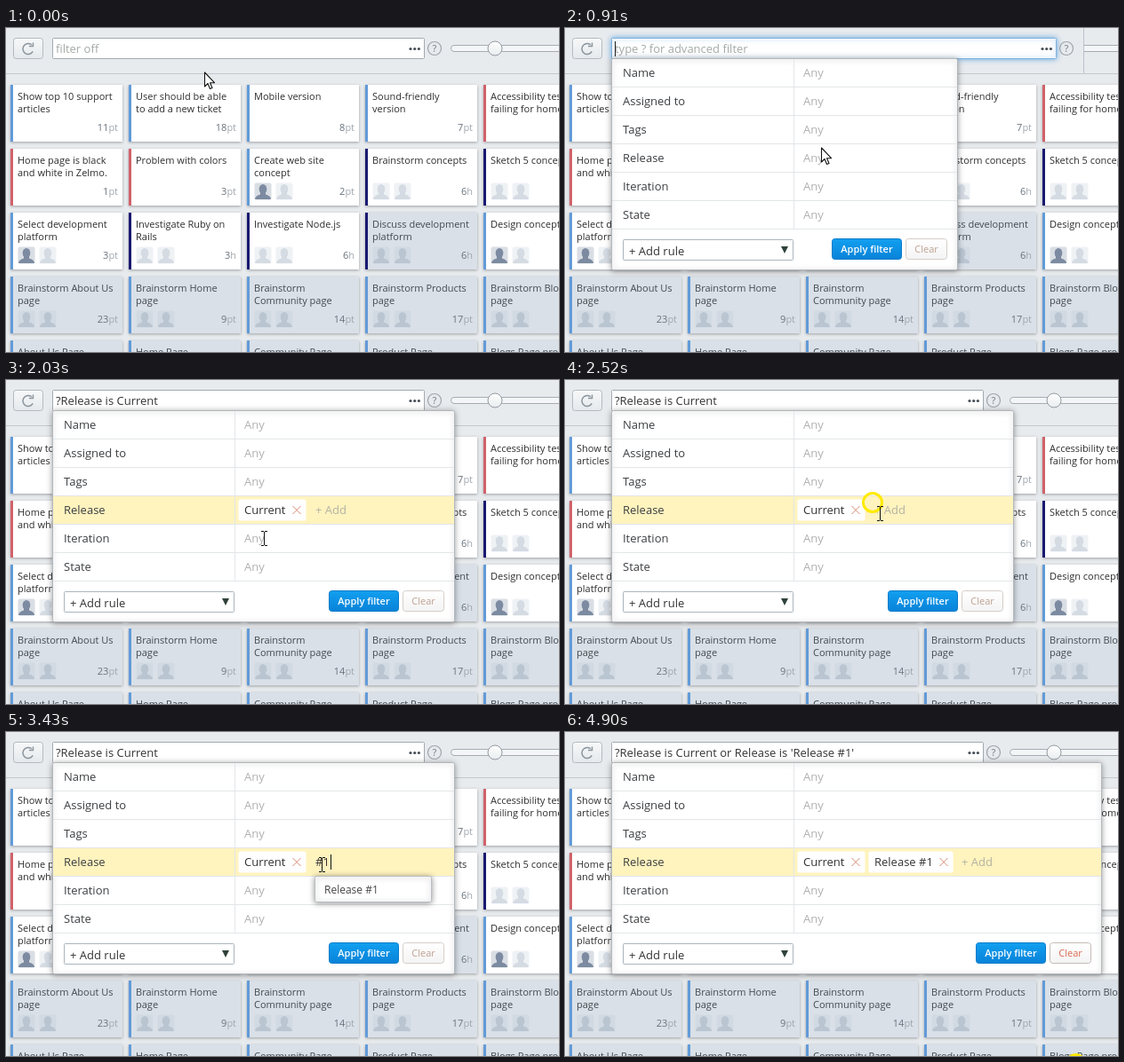
Animation, 622 px wide and 365 px high, one loop 5.04 s. Source, as an HTML page with a canvas:

```html
<!DOCTYPE html>
<html lang="en">
<head>
<meta charset="utf-8">
<title>Board filter</title>
<style>
html, body { margin: 0; width: 100%; height: 100%; overflow: hidden; background: #e8ebee; }
canvas { display: block; }
</style>
</head>
<body>
<canvas id="stage" width="622" height="365"></canvas>
<script>
const ctx = document.getElementById('stage').getContext('2d');
const LOOP = 5040, STEP = 70;
const BLUE = '#629bd8', RED = '#d0626b', NAVY = '#191970';

// bar colour, title lines, effort, avatars (D dark, L light), shaded
const rows = [
  [
    [BLUE, 'Show top 10 support|articles', '11pt'],
    [BLUE, 'User should be able|to add a new ticket', '18pt'],
    [BLUE, 'Mobile version', '8pt'],
    [BLUE, 'Sound-friendly|version', '7pt'],
    [RED, 'Accessibility test is|failing for home page', '']
  ], [
    [RED, 'Home page is black|and white in Zelmo.', '1pt'],
    [RED, 'Problem with colors', '3pt'],
    [BLUE, 'Create web site|concept', '2pt', 'DL'],
    [NAVY, 'Brainstorm concepts', '6h', 'LL'],
    [NAVY, 'Sketch 5 concepts', '', 'LL']
  ], [
    [BLUE, 'Select development|platform', '3pt', 'DL'],
    [NAVY, 'Investigate Ruby on|Rails', '3h', 'LL'],
    [NAVY, 'Investigate Node.js', '6h', 'LL'],
    [NAVY, 'Discuss development|platform', '6h', 'LL', true],
    [BLUE, 'Design concept', '', 'DL']
  ], [
    [BLUE, 'Brainstorm About Us|page', '23pt', 'LL', true],
    [BLUE, 'Brainstorm Home|page', '9pt', 'LL', true],
    [BLUE, 'Brainstorm|Community page', '14pt', 'LL', true],
    [BLUE, 'Brainstorm Products|page', '17pt', 'LL', true],
    [BLUE, 'Brainstorm Blogs|page', '', 'LL', true]
  ],
  ['About Us Page', 'Home Page', 'Community Page', 'Product Page', 'Blogs Page project']
    .map(title => [BLUE, title, '', '', true])
];
const rules = ['Name', 'Assigned to', 'Tags', 'Release', 'Iteration', 'State'];
const releases = ['Release #1', 'Release #2', 'Release #3'];

// time, x, y, shape
const pointer = [
  [0, 223, 50, 'arrow'], [70, 220, 34, 'arrow'], [140, 218, 21, 'beam'],
  [490, 218, 21, 'beam'], [560, 228, 40, 'arrow'], [840, 286, 131, 'arrow'],
  [980, 289, 139, 'beam'], [1470, 289, 139, 'beam'], [1540, 291, 148, 'beam'],
  [1610, 295, 165, 'hand'], [1680, 297, 172, 'hand'], [1820, 294, 175, 'hand'],
  [2030, 290, 178, 'beam'], [2100, 290, 178, 'beam'], [2380, 346, 138, 'beam'],
  [2450, 348, 141, 'beam'], [2520, 354, 150, 'beam'], [2590, 355, 149, 'beam'],
  [3570, 355, 149, 'beam'], [3640, 358, 160, 'beam'], [3710, 363, 169, 'hand'],
  [3850, 363, 171, 'hand'], [3920, 363, 174, 'beam'], [4340, 363, 174, 'beam'],
  [4410, 378, 187, 'arrow'], [4690, 542, 372, 'arrow'], [LOOP, 574, 374, 'arrow']
];
// start, end, x, y
const clicks = [
  [350, 490, 218, 21], [1050, 1190, 289, 139], [1960, 2030, 294, 176],
  [2450, 2590, 346, 138], [3780, 3920, 363, 173], [4900, LOOP, 574.5, 374]
];

const clamp = v => Math.max(0, Math.min(1, v));
const ease = v => { v = clamp(v); return v * v * (3 - 2 * v); };

function text(str, x, y, size = 13, color = '#333', weight = 400, align = 'left') {
  ctx.font = `${weight} ${size}px "Open Sans", sans-serif`;
  ctx.textAlign = align;
  ctx.fillStyle = color;
  ctx.fillText(str, x, y);
}

function rect(x, y, w, h, color) {
  ctx.fillStyle = color;
  ctx.fillRect(x, y, w, h);
}

function box(x, y, w, h, r, fill, border) {
  ctx.beginPath();
  ctx.roundRect(x + .5, y + .5, w - 1, h - 1, r);
  ctx.fillStyle = fill;
  ctx.fill();
  if (border) {
    ctx.strokeStyle = border;
    ctx.lineWidth = 1;
    ctx.stroke();
  }
}

function shadowed(color, blur, dy, draw) {
  ctx.save();
  ctx.shadowColor = color;
  ctx.shadowBlur = blur;
  ctx.shadowOffsetY = dy;
  draw();
  ctx.restore();
}

function vertical(y, h, top, bottom) {
  const g = ctx.createLinearGradient(0, y, 0, y + h);
  g.addColorStop(0, top);
  g.addColorStop(1, bottom);
  return g;
}

function line(points, color, width = 1) {
  ctx.beginPath();
  points.forEach(([x, y]) => ctx.lineTo(x, y));
  ctx.strokeStyle = color;
  ctx.lineWidth = width;
  ctx.stroke();
}

function circle(x, y, r, fill, stroke, width = 1) {
  ctx.beginPath();
  ctx.arc(x, y, r, 0, Math.PI * 2);
  if (fill) { ctx.fillStyle = fill; ctx.fill(); }
  if (stroke) { ctx.strokeStyle = stroke; ctx.lineWidth = width; ctx.stroke(); }
}

function avatar(x, y, dark, shaded) {
  const back = dark ? '#d9dee4' : shaded ? '#d1d9e2' : '#eff2f5';
  const body = dark ? '#7c8ba1' : shaded ? '#bac5d2' : '#d5dbe3';
  box(x, y, 20, 20, 2, back);
  ctx.fillStyle = body;
  ctx.beginPath();
  ctx.ellipse(x + 10, y + 7.5, 4.3, 5.5, 0, 0, Math.PI * 2);
  ctx.fill();
  ctx.fill(new Path2D(`M${x + 1} ${y + 19}q0-4 6-5.5v-3h6v3q6 1.500 6 5.500z`));
}

function card(x, y, [bar, title, effort, people = '', shaded]) {
  shadowed('rgba(0,0,0,.32)', 3, 1, () => rect(x, y, 126, 64, shaded ? '#d9e0e8' : '#fff'));
  rect(x, y, 3, 64, bar);
  title.split('|').forEach((s, i) => text(s, x + 8, y + 17 + i * 14, 11, shaded ? '#45494f' : '#2e2e2e'));
  [...people].forEach((p, i) => avatar(x + 8 + i * 24, y + 38, p === 'D', shaded));
  const unit = effort.replace(/\d+/, '');
  text(unit, x + 121, y + 52, 11, '#a0a7ae', 400, 'right');
  const unitWidth = ctx.measureText(unit).width;
  text(effort.replace(unit, ''), x + 121 - unitWidth, y + 52, 11, '#68727c', 400, 'right');
}

function board() {
  rect(0, 0, 622, 365, '#e8ebee');
  rows.forEach((row, r) => row.forEach((c, i) => card(5 + i * 133, 64 + r * 72, c)));
}

function toolbar(s) {
  rect(0, 51, 622, 1, '#c3c8cc');
  box(500, 19, 140, 8, 4, '#f3f5f6', '#a5acb2');
  circle(550, 23, 8, vertical(15, 16, '#fff', '#e9ecee'), '#929a a1'.replace(' ', ''));
  if (s.grow > 0) {
    const edge = Math.round(501 + 82 * s.grow);
    rect(0, 0, edge, 51, '#e8ebee');
    rect(edge, 0, 1, 51, '#bcc3c9');
  }

  box(8, 11, 34, 24, 3, vertical(11, 24, '#f7f8f9', '#e5e9ec'), '#b3bac0');
  ctx.beginPath();
  ctx.arc(25, 23.5, 6, .5, 5.4);
  ctx.strokeStyle = '#8a949d';
  ctx.lineWidth = 1.4;
  ctx.stroke();
  line([[30.500, 16.500], [30.500, 20.500], [26, 20.500]], '#8a949d', 1.4);

  const right = Math.round(471 + 82 * s.grow);
  const field = () => box(52, 11, right - 52, 24, 1, '#fff', s.focus ? '#7fb2dc' : '#a2aab1');
  if (s.focus) shadowed('rgba(70,150,220,.8)', 6, 0, field);
  else field();
  const hint = s.focus ? 'type ? for advanced filter' : 'filter off';
  text(s.query || hint, 56, 28, 13, s.query ? '#333' : '#a3aaa5');
  if (s.focus) rect(56, 15, 1, 17, '#222');
  for (let i = 0; i < 3; i++) circle(right - 16 + i * 4.7, 23.5, 1.6, '#444c54');
  circle(right + 11, 23, 7.5, null, '#9da5ac', 1.2);
  text('?', right + 11, 27, 11, '#8c959d', 600, 'center');
}

function remover(x) {
  line([[x - 4.500, 142], [x + 4.500, 151]], '#d58a72');
  line([[x + 4.500, 142], [x - 4.500, 151]], '#d58a72');
}

function panel(s) {
  const right = s.right, chosen = s.picked > 0;
  shadowed('rgba(0,0,0,.35)', 6, 1, () => box(52, 34, right - 52, 239, 2, '#fff', '#b1b7bc'));
  if (chosen) rect(53, 131, right - 54, 31, '#fff3be');
  rules.forEach((name, i) => {
    const y = 55 + i * 32;
    rect(53, y + 11, right - 54, 1, '#e3e6e8');
    text(name, 65, y, 13, '#3c3f42');
    if (i !== 3 || !chosen) text('Any', 268, y, 13, '#b0b0b0');
  });
  rect(257, 35, 1, 192, '#e3e6e8');

  if (chosen) {
    box(261, 134, 77, 25, 2, '#fff');
    text('Current', 268, 151);
    remover(327);
    if (s.picked > 1) {
      box(341, 134, 96, 25, 2, '#fff');
      text('Release #1', 348, 151);
      remover(426);
    }
    const x = s.picked > 1 ? 446 : 348;
    if (s.typed) text(s.typed, x, 151);
    else text('+ Add', x, 151, 13, '#b4b2a2');
    if (s.list === 'rest') rect(x + Math.round(s.typed ? ctx.measureText(s.typed).width + 1 : 0), 138, 1, 17, '#111');
  }
  if (s.list === 'all') rect(268, 138, 1, 17, '#222');

  box(65, 238, 192, 24, 1, '#fff', '#aab5be');
  text('+ Add rule', 72, 256);
  ctx.fillStyle = '#2f4238';
  ctx.fill(new Path2D('M243 246h8l-4 8z'));
  box(right - 142, 237, 79, 24, 3, vertical(237, 24, '#12a0f0', '#0882d8'), '#0a7ccb');
  text('Apply filter', right - 102.5, 253, 11, '#fff', 600, 'center');
  const active = s.picked > 1;
  box(right - 59, 237, 47, 24, 3, vertical(237, 24, '#fff', '#f3f3f3'), active ? '#c5bbb6' : '#d5cec8');
  text('Clear', right - 35.5, 253, 11, active ? '#d9694f' : '#bfa191', 400, 'center');
}

function dropdown(s) {
  if (!s.list) return;
  const all = s.list === 'all', x = all ? 268 : 348;
  const filtered = s.typed === '#1' && s.filtered;
  const top = filtered ? [] : [...(all ? ['Current'] : []), 'Future', 'None', 'Past'];
  const items = filtered ? ['Release #1'] : [...top, ...releases];
  const h = items.length * 28 + (top.length ? 1 : 0);
  shadowed('rgba(0,0,0,.4)', 6, 1, () => box(x - 1, 162, 132, h + 2, 2, '#fff', '#b9bec2'));
  if (s.hover) rect(x, 163, 130, 28, '#e5edf6');
  items.forEach((item, i) => {
    text(item, x + 10, 182 + i * 28 + (top.length && i >= top.length ? 1 : 0), 12, '#444');
  });
  if (top.length) rect(x, 163 + top.length * 28, 130, 1, '#dcdfe2');
}

const shapes = {
  arrow: new Path2D('M.5 0V16L4 12.500 6.500 18.500 9 17.500 6.500 11.700H11.500Z'),
  hand: new Path2D('M-2 1.500Q0-1.500 2 1.500V7Q4 5.500 5.500 7.500 7.500 6.500 8.500 8.500 10.500 8 11 10V15Q10.500 18 9 20H0Q-1 17-5.500 11.500-6.500 8.500-4 9.500L-2 12Z')
};

function cursor(t) {
  let i = pointer.length - 2;
  while (pointer[i][0] > t) i--;
  const [t0, x0, y0, kind] = pointer[i], [t1, x1, y1] = pointer[i + 1];
  const k = (t - t0) / (t1 - t0);
  ctx.save();
  ctx.translate(Math.round(x0 + (x1 - x0) * k), Math.round(y0 + (y1 - y0) * k));
  if (kind === 'beam') {
    rect(0, -7, 1, 15, '#111');
    [-8, 8].forEach(y => {
      rect(-3, y, 3, 1, '#111');
      rect(1, y, 3, 1, '#111');
    });
  } else {
    ctx.fillStyle = '#fff';
    ctx.strokeStyle = '#151515';
    ctx.lineWidth = 1.1;
    ctx.lineJoin = 'round';
    ctx.fill(shapes[kind]);
    ctx.stroke(shapes[kind]);
    if (kind === 'hand') [2, 5.5, 8.5].forEach(x => line([[x, 7], [x, 11]], '#151515'));
  }
  ctx.restore();
}

function stateAt(t) {
  const picked = (t >= 2030) + (t >= 3920);
  const list = t >= 1260 && t < 2030 ? 'all' : t >= 2590 && t < 3920 ? 'rest' : '';
  return {
    picked, list,
    open: t >= 490,
    focus: t >= 420 && t < 1120,
    grow: ease((t - 350) / 280) * (1 - ease((t - 1050) / 210)),
    right: [442, 505, 604][picked],
    query: ['', '?Release is Current', "?Release is Current or Release is 'Release #1'"][picked],
    typed: list === 'rest' ? '#1'.slice(0, (t >= 2940) + (t >= 3150)) : '',
    filtered: t >= 3430,
    hover: (list === 'all' && t >= 1610) || (list === 'rest' && t >= 3710)
  };
}

function draw(t) {
  const s = stateAt(t);
  board();
  toolbar(s);
  if (s.open) panel(s);
  dropdown(s);
  clicks.forEach(([from, to, x, y]) => {
    if (t >= from && t < to) circle(x, y, 10.5, null, '#ffea00', 3);
  });
  cursor(t);
}

function frame(now) {
  draw(Math.floor(now % LOOP / STEP) * STEP);
  requestAnimationFrame(frame);
}
requestAnimationFrame(frame);
</script>
</body>
</html>
```
